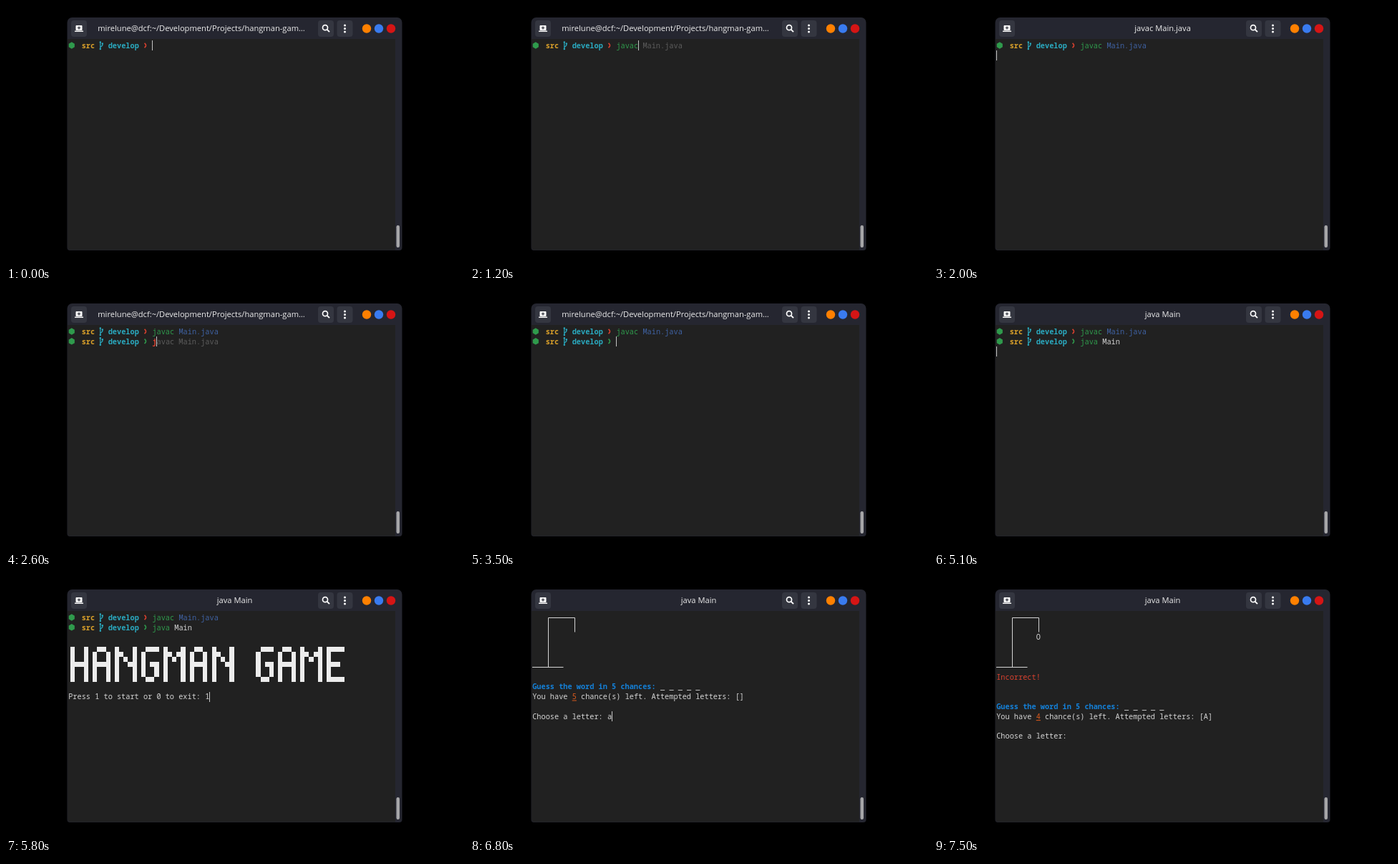
These frames come from a looping animation (640 px wide and 360 px high, 8 s). An HTML page with a canvas:

```html
<!DOCTYPE html>
<html lang="en">
<head>
<meta charset="utf-8">
<title>Terminal hangman</title>
<style>
  html, body { margin: 0; width: 100%; height: 100%; overflow: hidden; background: #000; }
  canvas { display: block; }
</style>
</head>
<body>
<canvas id="stage" width="640" height="360"></canvas>
<script>
const ctx = document.getElementById('stage').getContext('2d');
const LOOP = 8000, LEFT = 87.2, TOP = 48.1, CELL = 6.168, LINE = 13.8, BLINK = 600;
const WHITE = '#d4d4d4', GREEN = '#2f9a4c', RED = '#d8412f', TEAL = '#2aaac0', GOLD = '#d9a02a',
      BLUE = '#3f62a3', DIM = '#5c5c5c', AZURE = '#1480d8', ORANGE = '#dc5a1c';
const HISTORY = ['javac Main.java', 'java Main'];
const HOME_TITLE = 'mirelune@dcf:~/Development/Projects/hangman-gam…';

// [start time, screen, typed text]
const TIMELINE = [
  [0, 'first', ''], [500, 'first', 'j'], [700, 'first', 'ja'], [800, 'first', 'jav'],
  [1000, 'first', 'java'], [1100, 'first', 'javac'], [1300, 'first', 'javac '],
  [1400, 'first', 'javac Main.java'], [1700, 'compile', ''],
  [2200, 'second', ''], [2600, 'second', 'j'], [2700, 'second', 'ja'], [2800, 'second', 'jav'],
  [3000, 'second', 'java'], [3200, 'second', 'javac Main.java '], [3500, 'second', ''],
  [3900, 'second', 'j'], [4200, 'second', 'ja'], [4300, 'second', 'jav'], [4400, 'second', 'java'],
  [4600, 'second', 'java '], [4700, 'second', 'java M'], [4800, 'second', 'java Ma'],
  [4900, 'second', 'java Mai'], [5000, 'second', 'java Main'], [5100, 'run', ''],
  [5300, 'menu', ''], [5700, 'menu', '1'],
  [5900, 'guess', ''], [6700, 'guess', 'a'], [6900, 'miss', '']
];

const GLYPHS = {
  H: '#..# #..# #..# #### #..# #..# #..#',
  A: '.##. #..# #..# #### #..# #..# #..#',
  N: '#...# ##..# #.#.# #..## #...# #...# #...#',
  G: '.### #... #... #.## #..# #..# .##.',
  M: '#...# ##.## #.#.# #...# #...# #...# #...#',
  E: '#### #... #... ###. #... #... ####',
  ' ': '...'
};

const colX = col => LEFT + col * CELL;
const rowY = row => TOP + row * LINE;

function box(x, y, w, h, radius, color) {
  ctx.fillStyle = color;
  ctx.beginPath();
  ctx.roundRect(x, y, w, h, radius);
  ctx.fill();
}

function dot(x, y, r, color) {
  ctx.fillStyle = color;
  ctx.beginPath();
  ctx.arc(x, y, r, 0, Math.PI * 2);
  ctx.fill();
}

function stroke(points, color, width = 1) {
  ctx.strokeStyle = color;
  ctx.lineWidth = width;
  ctx.beginPath();
  points.forEach(([x, y]) => ctx.lineTo(x, y));
  ctx.stroke();
}

function put(col, row, text, color = WHITE, bold = false) {
  ctx.font = `${bold ? 700 : 500} 10.28px "Noto Sans Mono", "DejaVu Sans Mono", monospace`;
  ctx.textAlign = 'left';
  ctx.fillStyle = color;
  ctx.fillText(text, colX(col), rowY(row) + 10.6);
}

function cursor(col, row) {
  box(Math.floor(colX(col)), Math.round(rowY(row)), 1, 14, 0, '#c4c4c4');
}

function drawWindow(title) {
  box(85.5, 16, 468, 325, [7, 7, 4, 4], '#252630');
  box(86, 46, 458, 294.5, [0, 0, 0, 4], '#212121');
  box(545.5, 306, 4.5, 31, 2.2, '#a6a6a8');
  for (const x of [91, 436, 462.5]) box(x, 20, 22, 23, 4, '#343640');

  box(97.5, 27, 9, 7, 1, '#fff');
  box(96, 34.5, 12, 1.6, 0.5, '#fff');
  stroke([[102, 28.3], [102, 32.7]], '#343640', 1.2);
  stroke([[99.8, 30.5], [104.2, 30.5]], '#343640', 1.2);

  ctx.strokeStyle = '#fff';
  ctx.lineWidth = 1.7;
  ctx.beginPath();
  ctx.arc(446, 30.2, 3.5, 0, Math.PI * 2);
  ctx.stroke();
  stroke([[448.6, 32.8], [452, 36.2]], '#fff', 1.9);

  for (const y of [27, 31.5, 36]) dot(473.5, y, 1.5, '#fff');
  dot(504, 31.5, 6.2, '#ff8000');
  dot(521, 31.5, 6.2, '#397bf0');
  dot(538, 31.5, 6.2, '#d51515');

  ctx.font = '500 11.15px "Open Sans", "Noto Sans", sans-serif';
  ctx.textAlign = 'center';
  ctx.fillStyle = '#ececec';
  ctx.fillText(title, title === HOME_TITLE ? 273 : 319.5, 35.4);
}

function prompt(row, arrow) {
  const y = rowY(row) + LINE / 2;
  ctx.fillStyle = GREEN;
  ctx.beginPath();
  for (let i = 0; i < 6; i++) {
    const a = (i + 0.5) * Math.PI / 3;
    ctx.lineTo(91.8 + 4.7 * Math.cos(a), y + 4.7 * Math.sin(a));
  }
  ctx.fill();
  put(3, row, 'src', GOLD, true);
  stroke([[131.8, y - 4.5], [131.8, y + 5]], TEAL, 1.2);
  stroke([[134.8, y - 2], [134.8, y], [131.8, y + 2.5]], TEAL, 1.2);
  for (const [x, dy] of [[131.8, -4.5], [131.8, 5], [134.8, -2.5]]) dot(x, y + dy, 1.2, TEAL);
  put(9, row, 'develop', TEAL, true);
  stroke([[193.6, y - 3.3], [195.4, y - 1], [195.4, y + 1], [193.6, y + 3.3]], arrow, 1.6);
}

function command(row, text) {
  const [word, arg = ''] = text.split(' ');
  const known = word === 'java' || word === 'javac';
  const hint = text && HISTORY.find(line => line.startsWith(text));
  put(19, row, word, known ? GREEN : RED, !known);
  put(20 + word.length, row, arg, arg === 'Main.java' ? BLUE : WHITE);
  if (hint) put(19 + text.length, row, hint.slice(text.length), DIM);
}

// Pixels are snapped to whole coordinates so that neighbours join without seams.
function banner() {
  let left = 0.5;
  for (const letter of 'HANGMAN GAME') {
    const rows = GLYPHS[letter].split(' ');
    rows.forEach((row, j) => [...row].forEach((pixel, i) => {
      if (pixel !== '#') return;
      const x = Math.round(colX(left + i)), y = Math.round(rowY(3.5 + j / 2));
      const right = Math.round(colX(left + i + 1)), bottom = Math.round(rowY(4 + j / 2));
      box(x, y, right - x, bottom - y, 0, '#ececec');
    }));
    left += rows[0].length + 1;
  }
}

function gallows() {
  stroke([[109.5, 124], [109.5, 55.5], [146.5, 55.5], [146.5, 75.5]], WHITE);
  stroke([[87, 124.5], [130.5, 124.5]], WHITE);
}

function question(row, chances, attempted, typed) {
  put(0, row, 'Guess the word in 5 chances:', AZURE, true);
  put(29, row, '_ _ _ _ _');
  put(0, row + 1, 'You have');
  put(9, row + 1, chances, ORANGE);
  box(colX(9), rowY(row + 1) + 12, CELL, 1, 0, ORANGE);
  put(11, row + 1, `chance(s) left. Attempted letters: [${attempted}]`);
  put(0, row + 3, 'Choose a letter: ' + typed);
  return [17 + typed.length, row + 3];
}

// Each screen paints itself and returns the cursor cell.
const SCREENS = {
  first(text) {
    prompt(0, RED);
    command(0, text);
    return [19 + text.length, 0];
  },
  compile() {
    SCREENS.first('javac Main.java');
    return [0, 1];
  },
  second(text) {
    SCREENS.compile();
    prompt(1, GREEN);
    command(1, text);
    return [19 + text.length, 1];
  },
  run() {
    SCREENS.second('java Main');
    return [0, 2];
  },
  menu(text) {
    const line = 'Press 1 to start or 0 to exit: ' + text;
    SCREENS.run();
    banner();
    put(0, 8, line);
    return [line.length, 8];
  },
  guess(text) {
    gallows();
    return question(7, '5', '', text);
  },
  miss(text) {
    gallows();
    put(9, 2, 'O');
    put(0, 6, 'Incorrect!', RED);
    return question(9, '4', 'A', text);
  }
};

function titleOf(screen) {
  if (screen === 'first' || screen === 'second') return HOME_TITLE;
  return screen === 'compile' ? 'javac Main.java' : 'java Main';
}

function draw(time) {
  const [start, screen, text] = TIMELINE.findLast(([at]) => at <= time);
  ctx.fillStyle = '#000';
  ctx.fillRect(0, 0, 640, 360);
  drawWindow(titleOf(screen));
  const cell = SCREENS[screen](text);
  if (Math.floor((time - start) / BLINK) % 2 === 0) cursor(...cell);
}

function tick() {
  draw(performance.now() % LOOP);
  requestAnimationFrame(tick);
}
tick();
</script>
</body>
</html>
```
